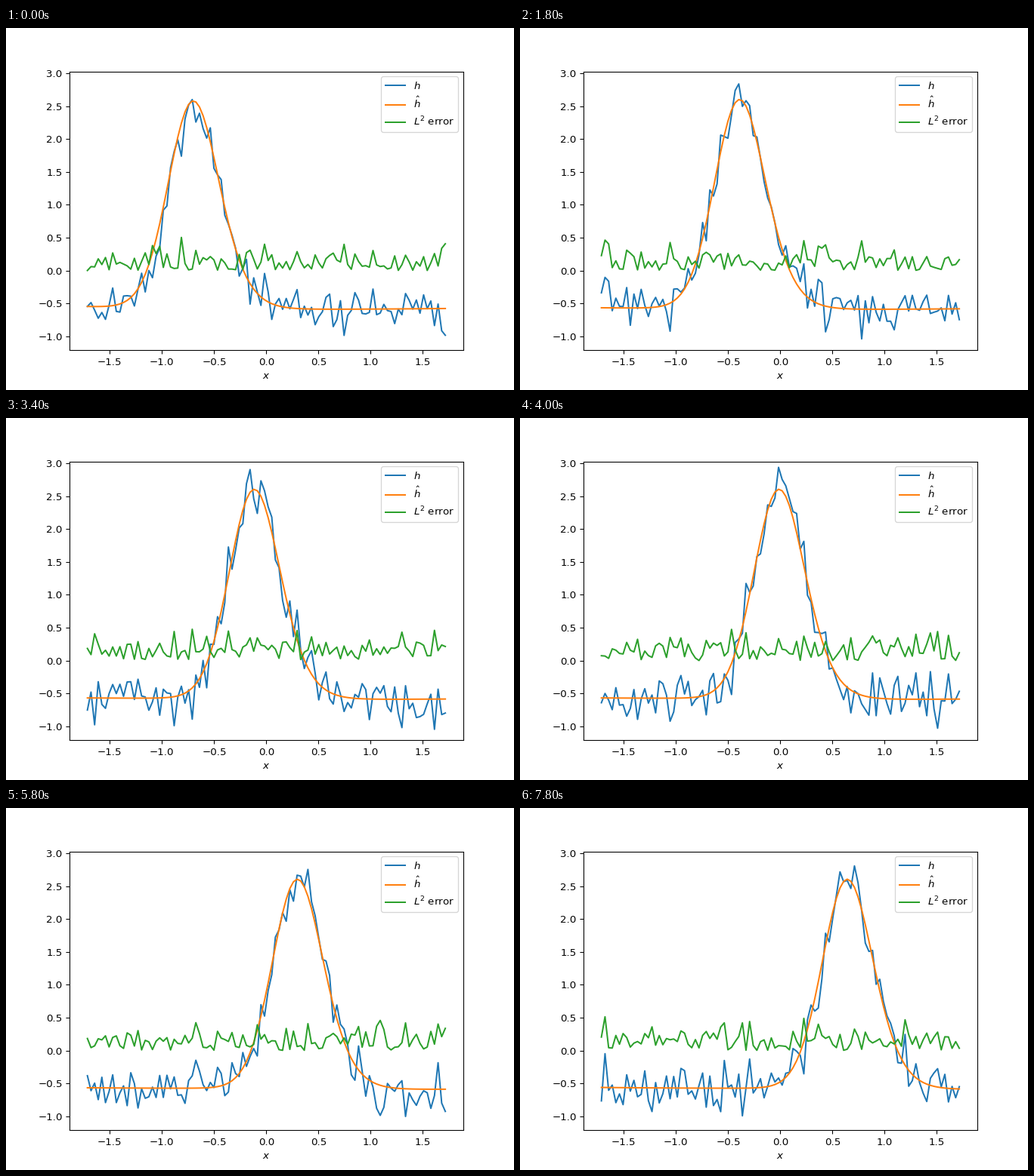
A matplotlib script that plays this animation: 672 by 480 pixels, repeating every 8000 ms.

```python
import numpy as np
import matplotlib.pyplot as plt
from matplotlib.animation import FuncAnimation

FRAMES = 40
POINTS = 100
NOISE = 0.2

x = np.arange(POINTS, dtype=float)
x = (x - x.mean()) / x.std()

noise = np.random.default_rng(7).normal(0, NOISE, (FRAMES, POINTS))


def flank(d, width, knee):
    """Bell flank: Gaussian near the top, exponential beyond the knee."""
    steep = (knee / width) ** 2
    return np.exp(-steep * (np.sqrt(1 + (d / knee) ** 2) - 1))


def wave(n):
    """Smooth pulse travelling to the right, with a slightly longer front."""
    d = x - (-0.70 + 0.0344 * n)
    bell = np.where(d < 0, flank(d, 0.238, 1.5), flank(d, 0.245, 0.6))
    base = -0.5815 - 0.0085 * np.tanh(d / 0.3)
    base += 0.0055 * np.maximum(np.abs(d) - 0.9, 0) ** 2
    base += 0.026 * np.exp(-n / 6 - (x - x[0]) / 0.6)
    peak = 2.605 - 0.03 * np.exp(-n / 5)
    return base + (peak + 0.5815) * bell


fig, ax = plt.subplots(figsize=(7, 5), dpi=96)
h_line, = ax.plot([], [], label="$h$")
fit_line, = ax.plot([], [], label=r"$\hat{h}$")
err_line, = ax.plot([], [], label="$L^2$ error")
ax.set_xlim(1.1 * x[0], 1.1 * x[-1])
ax.set_ylim(-1.211, 3.027)
ax.set_xlabel("$x$")
ax.legend(loc="upper right")


def update(n):
    fit = wave(n)
    h_line.set_data(x, fit + noise[n])
    fit_line.set_data(x, fit)
    err_line.set_data(x, np.abs(noise[n]))
    return h_line, fit_line, err_line


anim = FuncAnimation(fig, update, frames=FRAMES, interval=200, repeat=True)
plt.show()
```
